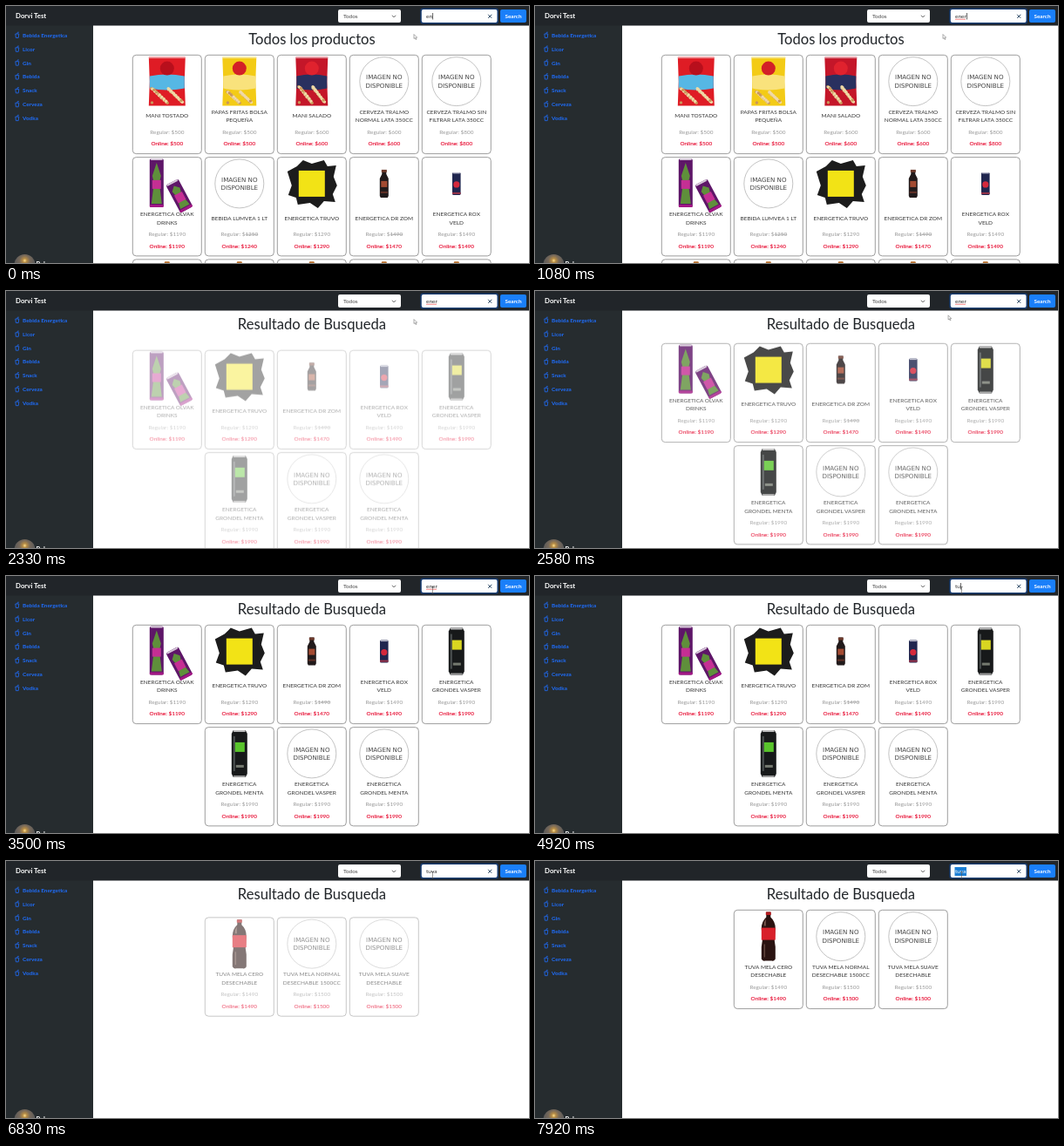
An HTML page that plays this animation: 600x295 px, repeating every 8000 ms.

```html
<!DOCTYPE html>
<html lang="es">
<head>
<meta charset="utf-8">
<style>
html, body { margin: 0; width: 100%; height: 100%; overflow: hidden; background: #fff; }
svg { display: block; width: 600px; height: 295px; font: 6.4px Lato, sans-serif; }
.bold { font-weight: 700; }
.mid { text-anchor: middle; }
.title { font-size: 16.6px; fill: #212529; }
.name { font-size: 6.5px; fill: #333; }
.regular { fill: #999; }
.online { fill: #e8193c; font-weight: 500; stroke: #e8193c; stroke-width: .12; }
.missing { font: 7.1px "DejaVu Sans", sans-serif; fill: #444; }
</style>
</head>
<body>
<svg id="stage" viewBox="0 0 600 295"></svg>
<script>
const LOOP = 8000, FADE = 1000;
const stage = document.getElementById('stage');

const rect = (x, y, w, h, fill, rx = 0) =>
  `<rect x="${x}" y="${y}" width="${w}" height="${h}" rx="${rx}" fill="${fill}"/>`;
const circle = (x, y, r, fill, more = '') =>
  `<circle cx="${x}" cy="${y}" r="${r}" fill="${fill}" ${more}/>`;
const path = (d, fill, more = '') => `<path d="${d}" fill="${fill}" ${more}/>`;
const text = (x, y, cls, body, more = '') =>
  `<text x="${x}" y="${y}" class="${cls}" ${more}>${body}</text>`;

// Pictures are drawn around the centre of the card's picture area.
function nuts(top, bottom, halfWidth) {
  let out = '';
  for (let i = 0; i < 48; i++) {
    const x = (i * 7.31 % 1 * 2 - 1) * halfWidth;
    const y = top + (i * 3.618 % 1) * (bottom - top);
    out += circle(x.toFixed(1), y.toFixed(1), 1.7, i % 3 ? '#f0d9a5' : '#c9975a');
  }
  return out;
}
const bag = (w, main, band, logo, filling) =>
  path(`M${-w} -28H${w}L${w - 1} 0L${w} 28H${-w}L${1 - w} 0Z`, main) +
  path(`M${1 - w} -6Q0 -10 ${w - 1} -6V8Q0 12 ${1 - w} 8Z`, band) +
  filling + circle(0, -15, 8, logo) + rect(-w, -28, 2 * w, 1.5, '#fff8', 0);

const slimCan = (h) =>
  rect(-8, -h, 16, 2 * h, '#5e1668', 2.5) + rect(-7, -h, 14, 2, '#d5c8d8', 1) +
  path(`M-6 ${h - 4}L-3 0L-5 -8L0 ${5 - h}L5 -8L3 0L6 ${h - 4}Z`, '#5f8f3b') +
  rect(-5, -3, 10, 10, '#c52f94') + rect(-8, h - 3, 16, 3, '#a31784', 1);

const tallCan = color =>
  path('M-7 -27H7L9 -23V23L7 27H-7L-9 23V-23Z', '#17191a') +
  rect(-7, -27, 14, 2, '#bbb', 1) + rect(-7, 25, 14, 2, '#999', 1) +
  rect(-7, -20, 2, 40, '#4b5050') + rect(-5, -13, 11, 11, color) +
  rect(-4, 13, 9, 3, '#74796f');

const pictures = {
  missing: circle(0, 0, 28, '#fff', 'stroke="#aaa" stroke-width=".7"') +
    text(0, -2.4, 'missing mid', 'IMAGEN NO') + text(0, 6.9, 'missing mid', 'DISPONIBLE'),
  peanuts: bag(21, '#df1c25', '#56b7e4', '#b80f1c', nuts(8, 25, 18)),
  chips: bag(19.5, '#f3cb16', '#f9e27c', '#d32027', nuts(12, 25, 14)),
  salted: bag(18.5, '#c41629', '#29305f', '#e0222e', nuts(6, 25, 15)),
  twoCans: `<g transform="translate(-12 -1)">${slimCan(28)}</g>
    <g transform="translate(14 14) rotate(-28)">${slimCan(18)}</g>`,
  splash: path('M-28 -14L-17 -20L-10 -27L0 -23L14 -27L18 -20L28 -21L25 -8L29 2L24 12L27 21L14 20L7 28L-2 22L-16 24L-18 16L-27 13L-23 2Z',
    '#1c1c1c') + rect(-15, -15, 30, 30, '#f2e316'),
  bottle: path('M-2.5 -16H2.5V-11L5 -6V14L4 16H-4L-5 14V-6L-2.5 -11Z', '#211a1b') +
    rect(-3, -16, 6, 3, '#6d3a2c') + rect(-3.5, -3, 7, 7, '#a34a31') + rect(-4, 9, 8, 2, '#613026'),
  smallCan: rect(-4.8, -13, 9.6, 26, '#20264f', 1.5) + rect(-4, -13, 8, 1.5, '#bbc') +
    circle(0, 1, 3.6, '#d4283c') + rect(-4.8, 10, 9.6, 2, '#993349'),
  yellowCan: tallCan('#d9d621'),
  greenCan: tallCan('#59c52c'),
  cola: path('M-2.5 -28H2.5V-22Q8 -17 8 -9L7 5L8 12V26Q6 29 4 28H-4Q-6 29 -8 26V12L-7 5L-8 -9Q-8 -17 -2.5 -22Z', '#2a1311') +
    rect(-3, -28, 6, 3.5, '#b51c20', .5) + rect(-8, -10, 16, 14, '#d8202a') +
    path('M-5 -16L-3 -20V-12H-5ZM-5 9L-4 9V24H-5Z', '#76584f'),
  tip: rect(-3, -28, 6, 8, '#b8702e', 1)
};

// [picture, name lines, regular price, online price]
const energy = [
  ['twoCans', 'ENERGETICA OLVAK|DRINKS', 1190, 1190],
  ['splash', 'ENERGETICA TRUVO', 1290, 1290],
  ['bottle', 'ENERGETICA DR ZOM', 1490, 1470],
  ['smallCan', 'ENERGETICA ROX|VELD', 1490, 1490]
];
const all = [
  ['peanuts', 'MANI TOSTADO', 500, 500],
  ['chips', 'PAPAS FRITAS BOLSA|PEQUEÑA', 500, 500],
  ['salted', 'MANI SALADO', 600, 600],
  ['missing', 'CERVEZA TRALMO|NORMAL LATA 350CC', 600, 600],
  ['missing', 'CERVEZA TRALMO SIN|FILTRAR LATA 350CC', 800, 800],
  energy[0],
  ['missing', 'BEBIDA LUMVEA 1 LT', 1250, 1240],
  ...energy.slice(1),
  ...Array(5).fill(['tip', '', 1500, 1500])
];
const energyResults = [
  ...energy,
  ['yellowCan', 'ENERGETICA|GRONDEL VASPER', 1990, 1990],
  ['greenCan', 'ENERGETICA|GRONDEL MENTA', 1990, 1990],
  ['missing', 'ENERGETICA|GRONDEL VASPER', 1990, 1990],
  ['missing', 'ENERGETICA|GRONDEL MENTA', 1990, 1990]
];
const colaResults = [
  ['cola', 'TUVA MELA CERO|DESECHABLE', 1490, 1490],
  ['missing', 'TUVA MELA NORMAL|DESECHABLE 1500CC', 1500, 1500],
  ['missing', 'TUVA MELA SUAVE|DESECHABLE', 1500, 1500]
];

function card([picture, name, regular, online], x, y) {
  const lines = name.split('|');
  const first = lines.length > 1 ? 67.6 : 72.2;
  const price = regular === online ? `$${regular}` :
    `$<tspan text-decoration="line-through">${regular}</tspan>`;
  return `<g transform="translate(${x} ${y})">
    <rect width="79" height="113.3" rx="4" fill="#fff" stroke="#858585" stroke-width=".8"/>
    <g transform="translate(39.5 30.3)">${pictures[picture]}</g>
    ${lines.map((line, i) => text(39.5, first + i * 9.4, 'name mid', line)).join('')}
    ${text(39.5, 90.6, 'regular mid', `Regular: ${price}`)}
    ${text(39.5, 104.2, 'online mid', `Online: $${online}`)}
  </g>`;
}

function view(id, title, products) {
  const cards = products.map((product, i) => {
    const row = Math.floor(i / 5);
    const inRow = Math.min(5, products.length - row * 5);
    return card(product, 145.3 + (5 - inRow) * 41.5 + (i % 5) * 83, 56.3 + row * 117.3);
  });
  return `<g id="${id}">${text(351, 43.6, 'title mid', title)}<g class="cards">${cards.join('')}</g></g>`;
}

const menu = ['Bebida Energetica', 'Licor', 'Gin', 'Bebida', 'Snack', 'Cerveza', 'Vodka'];
const menuItem = (label, i) => {
  const y = 33.5 + i * 15.85;
  return text(19, y + 2.3, 'bold', label, 'fill="#1f6dfa"') +
    path(`M10.8 ${y - 1.5}H14.8L14.2 ${y + 3}H11.4ZM12.8 ${y - 1.5}L13.3 ${y - 3.3}H14.8`,
      'none', 'stroke="#1f6dfa" stroke-width=".8"');
};

stage.innerHTML = `
  <defs><radialGradient id="glow" cy=".3">
    <stop offset="0" stop-color="#ffe08a"/><stop offset=".2" stop-color="#b48a45"/>
    <stop offset=".5" stop-color="#77695a"/><stop offset="1" stop-color="#59595a"/>
  </radialGradient></defs>
  ${rect(0, 0, 600, 295, '#fff')}
  ${view('all', 'Todos los productos', all)}
  ${view('energy', 'Resultado de Busqueda', energyResults)}
  ${view('cola', 'Resultado de Busqueda', colaResults)}
  <g id="spinner">${path('M16.26 -16.26A23 23 0 0 1 16.26 16.26L12 12A17 17 0 0 0 12 -12Z', '#43b4f2')}</g>
  ${rect(0, 22, 100, 273, '#262c2f')}
  ${rect(0, 0, 600, 22.5, '#212529')}
  ${text(11, 14, 'bold', 'Dorvi Test', 'fill="#fff" font-size="7.8"')}
  ${menu.map(menuItem).join('')}
  ${circle(21.5, 297, 12, 'url(#glow)')}
  ${text(34.5, 298.6, 'bold', 'Pelmas', 'fill="#fff" font-size="7.5"')}
  ${rect(381, 4, 72, 15, '#fff', 2)}
  ${text(387, 13.8, '', 'Todos', 'fill="#444"')}
  ${path('M443 10.8l2 2 2 -2', 'none', 'stroke="#444" stroke-width=".9"')}
  ${rect(475.3, 2.5, 89.7, 18, '#173b70', 3)}
  ${rect(476.8, 4, 86.7, 15, '#fff', 2)}
  ${path('M553.2 9.8l4 4m0 -4l-4 4', 'none', 'stroke="#23415f" stroke-width="1"')}
  ${rect(567, 4, 30, 15, '#1a7ffa', 2)}
  ${text(582, 14, 'bold mid', 'Search', 'fill="#fff"')}
  <rect id="selection" x="481.5" y="7" height="10" fill="#1b7fd6"/>
  <text id="query" x="482" y="13.9" font-size="6.5"/>
  <path id="squiggle" fill="none" stroke="#e33" stroke-width=".6"/>
  <rect id="caret" y="8" width=".7" height="7.5" fill="#222"/>
  <path id="arrow" d="M0 0V5L1.2 4L2.1 6L3 5.6L2.1 3.7H3.7Z" fill="#fff" stroke="#777" stroke-width=".6"/>
  <path id="beam" d="M-1.3 -3.5H1.3M0 -3.5V3.5M-1.3 3.5H1.3" stroke="#555" stroke-width=".6"/>`;

const $ = id => document.getElementById(id);
const show = (id, on) => { $(id).style.display = on ? '' : 'none'; };
const place = (id, x, y) => $(id).setAttribute('transform', `translate(${x} ${y})`);

// CSS "ease": cubic-bezier(.25, .1, .25, 1)
function ease(x) {
  if (x <= 0) return 0;
  if (x >= 1) return 1;
  const bezier = (a, b, s) => 3 * a * s * (1 - s) ** 2 + 3 * b * s * s * (1 - s) + s ** 3;
  let low = 0, high = 1;
  for (let i = 0; i < 20; i++) {
    const mid = (low + high) / 2;
    if (bezier(.25, .25, mid) < x) low = mid; else high = mid;
  }
  return bezier(.1, 1, low);
}

const views = [[0, 'all'], [1250, 'spinner'], [2080, 'energy'], [5830, 'spinner'], [6500, 'cola']];
const typing = [[0, 'en'], [330, 'ene'], [670, 'ener'], [4500, 't'], [4750, 'tu'], [5080, 'tuv'], [5330, 'tuva']];
const latest = (steps, t) => steps.findLast(([start]) => start <= t);

function drawResults(t) {
  const [start, current] = latest(views, t);
  for (const id of ['all', 'energy', 'cola', 'spinner']) show(id, id === current);
  if (current === 'spinner') {
    $('spinner').setAttribute('transform', `translate(295 142) rotate(${(t - 1830) * .36})`);
  } else if (current !== 'all') {
    const shown = ease((t - start) / FADE);
    const cards = $(current).querySelector('.cards');
    cards.setAttribute('opacity', shown);
    cards.setAttribute('transform', `translate(0 ${20 * (1 - shown)})`);
  }
}

function drawSearch(t) {
  const [start, word] = latest(typing, t);
  const selected = (t >= 3920 && t < 4500) || t >= 7700;
  const query = $('query');
  query.textContent = word;
  query.setAttribute('fill', selected ? '#fff' : '#333');
  const width = query.getComputedTextLength();
  show('selection', selected);
  $('selection').setAttribute('width', width + 1);
  show('caret', !selected && (t - start) % 1000 < 500);
  $('caret').setAttribute('x', 482.3 + width);
  show('squiggle', word === 'ener' && !selected);
  $('squiggle').setAttribute('d', 'M482 15.6' + 'l1 -.7l1 .7'.repeat(Math.round(width / 2)));
}

function drawPointer(t) {
  const moved = ease((t - 2420) / 830);
  const x = 468 + 21.5 * moved, y = 32.5 - 16.5 * moved;
  const overInput = y < 19;
  show('arrow', !overInput);
  show('beam', overInput);
  place('arrow', x, y);
  place('beam', x, y);
}

function frame(now) {
  const t = (now - began) % LOOP;
  drawResults(t);
  drawSearch(t);
  drawPointer(t);
  requestAnimationFrame(frame);
}
const began = performance.now();
frame(began);
</script>
</body>
</html>
```
